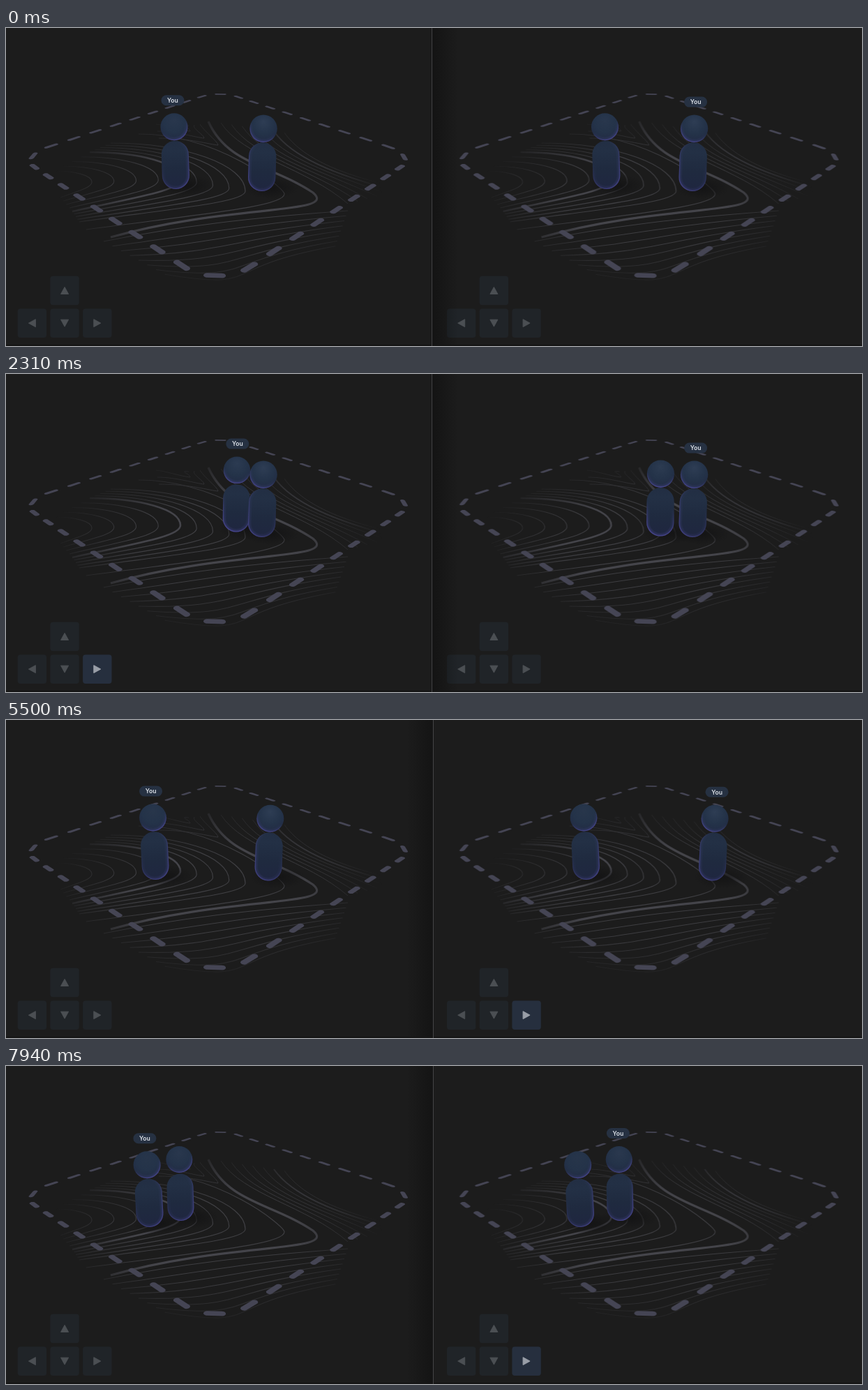
Recreate the animation shown at these times as an HTML page with a canvas. Size 1227x456 px, loop 8 s.

```html
<!DOCTYPE html>
<html lang="en">
<head>
<meta charset="utf-8">
<title>Two players</title>
<style>
html, body { margin: 0; width: 100%; height: 100%; overflow: hidden; background: #1c1c1c; }
canvas { display: block; width: 1227px; height: 456px; }
</style>
</head>
<body>
<canvas id="stage" width="1227" height="456"></canvas>
<script>
const W = 1227, H = 456, LOOP = 8000, STEP = 62.5;
const LAG = 170, SOFT = 140, CENTER = 304.6;
const BOARD_SHIFT = 617.5, PAD_SHIFT = 615.3;
const ctx = document.getElementById('stage').getContext('2d');
const clamp = (v, lo, hi) => Math.max(lo, Math.min(hi, v));

// ---------- motion ----------
// A leg moves a foot by (dx, dy) while its key is held; a push has no key.
const leg = (key, from, to, dx, dy) => ({ key, from, to, dx, dy });
const leftPlayer = {
  x: 244, y: 231,
  legs: [
    leg('left', 270, 820, -104, 0),
    leg('down', 960, 1290, 0, 27),
    leg('right', 1240, 2070, 183, 0),
    leg('up', 1750, 2150, 0, -31.5),
    leg('right', 2070, 2480, 16, 0),
    leg('left', 2500, 3300, -165, 2.5),
    leg('right', 3520, 3860, 41, 0),
    leg('push', 7400, 7640, -8, 2)
  ]
};
const rightPlayer = {
  x: 366, y: 234,
  legs: [
    leg('push', 2300, 2480, 8.5, -3.5),
    leg('right', 5290, 6136, 118.5, 0),
    leg('down', 6100, 6440, 0, 15),
    leg('left', 6321, 7595, -242, 0),
    leg('up', 6700, 7000, 0, -23.5),
    leg('right', 7785, 8000, 32, 0)
  ]
};

// Time travelled since a start, with a soft build-up of speed.
const ramp = s => s <= 0 ? 0 : s < SOFT ? s * s / (2 * SOFT) : s - SOFT / 2;

function foot(player, t) {
  let { x, y } = player;
  for (const { from, to, dx, dy } of player.legs) {
    const done = (ramp(t - from) - ramp(t - to)) / (to - from);
    x += dx * done;
    y += dy * done;
  }
  return { x, y };
}
const holds = (player, key, t) =>
  player.legs.some(l => l.key === key && t >= l.from && t < l.to);

// ---------- board ----------
// Square-plane coordinates: (0,0) left, (1,0) near, (1,1) right, (0,1) far corner.
function plane(a, b) {
  const X = a + b - 1, Y = b - a, w = 1 + 0.0026 * X + 0.338 * Y;
  return [(CENTER + 286.4 * X + 104.3 * Y) / w, (184.05 + 0.13 * X - 63.6 * Y) / w];
}

const RADIUS = 0.115, SIDE = 1 - 2 * RADIUS, QUARTER = SIDE + RADIUS * Math.PI / 2;

// A point on the rounded border, pushed outward by off.
function border(u, off) {
  const turn = Math.floor(u / QUARTER);
  const s = u - turn * QUARTER;
  let a = RADIUS + s, b = -off;
  if (s > SIDE) {
    const angle = (s - SIDE) / RADIUS, r = RADIUS + off;
    a = 1 - RADIUS + r * Math.sin(angle);
    b = RADIUS - r * Math.cos(angle);
  }
  for (let k = 0; k < (turn + 4) % 4; k++) [a, b] = [1 - b, a];
  return plane(a, b);
}

function drawDash(g, u) {
  const half = 0.0185, thick = 0.0088;
  g.beginPath();
  for (const end of [1, -1]) {
    for (let k = 0; k <= 10; k++) {
      const angle = Math.PI * (k / 10 - 0.5);
      g.lineTo(...border(u + end * (half + thick * Math.cos(angle)), end * thick * Math.sin(angle)));
    }
  }
  g.fill();
}

const THIN = '#404044', BOLD = '#46464c';

// Points are a start followed by triples of two handles and an end.
function curve(g, p, width, color = THIN) {
  g.beginPath();
  g.moveTo(...p[0]);
  for (let i = 1; i < p.length; i += 3) g.bezierCurveTo(...p[i], ...p[i + 1], ...p[i + 2]);
  g.lineWidth = width;
  g.strokeStyle = color;
  g.stroke();
}
const mix = (p, q, f) => p.map((a, i) => [a[0] + (q[i][0] - a[0]) * f, a[1] + (q[i][1] - a[1]) * f]);

function family(g, p, q, count, reach, width) {
  for (let i = 0; i <= count; i++) curve(g, mix(p, q, reach * i / count), width);
}

// A contour that runs out to a tip and back; round sets how blunt the upper side is.
function tongue([x0, y0], [tx, ty], [x1, y1], round) {
  return [
    [x0, y0], [x0 + (tx - x0) * 0.55, y0], [tx, ty - (ty - y0) * round], [tx, ty],
    [tx, ty + (y1 - ty) * 0.35], [x1 + (tx - x1) * 0.6, y1 - (y1 - ty) * 0.45], [x1, y1]
  ];
}
const core = tongue([70, 205], [123, 221], [78, 243], 0.6);
const ridge = tongue([120, 178], [250, 217], [95, 263], 0.6);
const flank = tongue([150, 165], [343, 234], [105, 278], 0.55);
const spur = tongue([190, 152], [399, 238], [115, 289], 0.1);
const valley = [[290, 134], [318, 196], [380, 196], [440, 236], [478, 268], [320, 252], [150, 300]];
const south = [[[140, 306], [250, 284], [350, 272], [490, 262]], [[190, 333], [320, 337], [320, 313], [480, 291]]];
const east = [[[308, 136], [340, 185], [430, 200], [490, 252]], [[384, 148], [410, 185], [470, 210], [560, 234]]];

function makeBoard() {
  const c = document.createElement('canvas');
  c.width = 614;
  c.height = H;
  const g = c.getContext('2d');

  family(g, core, ridge, 4, 1, 1.1);
  family(g, ridge, flank, 4, 1, 1.2);
  curve(g, spur, 1.2);
  family(g, ...south, 7, 1.75, 1.1);
  family(g, ...east, 6, 1.2, 1);
  for (let i = 0; i < 3; i++) {
    const x = 304 - 20 * i, y = 168 - 10 * i;
    curve(g, [[278 - 8 * i, 138 + i], [x - 18, y - 18 + 4 * i], [x, y - 5], [x, y],
              [x - 12, y - 1], [x - 40, y - 10], [x - 85 + 18 * i, y - 10]], 0.9);
  }
  curve(g, east[1], 2, BOLD);
  curve(g, ridge, 2.6, BOLD);
  curve(g, valley, 3.2, BOLD);

  // Fade the contour lines towards the rim.
  g.globalCompositeOperation = 'destination-in';
  g.translate(300, 245);
  g.scale(1, 0.54);
  const fade = g.createRadialGradient(0, 0, 0, 0, 0, 240);
  fade.addColorStop(0, 'rgba(0,0,0,1)');
  fade.addColorStop(0.5, 'rgba(0,0,0,0.95)');
  fade.addColorStop(0.8, 'rgba(0,0,0,0.4)');
  fade.addColorStop(1, 'rgba(0,0,0,0)');
  g.fillStyle = fade;
  g.fillRect(-400, -500, 1000, 1000);

  g.resetTransform();
  g.globalCompositeOperation = 'source-over';
  g.fillStyle = '#454554';
  for (let k = 0; k < 40; k++) drawDash(g, (k + 40) * QUARTER / 10 - 0.0016);
  return c;
}

// ---------- figures ----------
function gradient(x0, y0, x1, y1, ...stops) {
  const g = ctx.createLinearGradient(x0, y0, x1, y1);
  stops.forEach(([at, color]) => g.addColorStop(at, color));
  return g;
}

const CLEAR = 'rgba(88,82,175,0)', GLOW = 'rgb(88,82,175)';

// Glow along the inside of the current path.
function rim(paint) {
  ctx.clip();
  ctx.strokeStyle = paint;
  for (const [width, alpha] of [[9, 0.14], [5, 0.22], [2.2, 0.6]]) {
    ctx.globalAlpha = alpha;
    ctx.lineWidth = width;
    ctx.stroke();
  }
}

function drawShadow({ x, y }) {
  ctx.save();
  ctx.translate(x + 14, y - 5);
  ctx.scale(1, 0.4);
  const g = ctx.createRadialGradient(0, 0, 4, 0, 0, 40);
  g.addColorStop(0, 'rgba(18,18,19,0.75)');
  g.addColorStop(1, 'rgba(18,18,19,0)');
  ctx.fillStyle = g;
  ctx.fillRect(-40, -40, 80, 80);
  ctx.restore();
}

function drawFigure({ x, y }) {
  const near = y - 222;
  const r = 19 + near * 0.057, rise = 88 + near * 0.143, tall = 3.55 * r;
  const lean = (x - CENTER) * 0.05;
  const inner = clamp((CENTER - x) / 60, -1, 1);

  ctx.save();
  ctx.translate(x, y);
  ctx.rotate(Math.atan2(lean, rise));
  ctx.beginPath();
  ctx.roundRect(-r, -tall, 2 * r, tall, r);
  ctx.fillStyle = gradient(0, -tall, 0, 0, [0, '#222e43'], [0.2, '#233045'], [0.6, '#1f2a3f'], [1, '#1f2640']);
  ctx.fill();
  rim(gradient(-inner * 2 * r, -tall * 0.9, inner * 2 * r, 0, [0.3, CLEAR], [0.9, GLOW]));
  ctx.restore();

  ctx.save();
  ctx.translate(x + lean, y - rise);
  ctx.beginPath();
  ctx.arc(0, 0, r, 0, Math.PI * 2);
  const lit = clamp((x - 200) / 170, 0, 1);
  const ball = ctx.createRadialGradient(0, -r * 0.5, 0, 0, -r * 0.3, r * 1.4);
  ball.addColorStop(0, `rgb(${39 + 7 * lit},${53 + 8 * lit},${74 + 10 * lit})`);
  ball.addColorStop(0.55, '#243349');
  ball.addColorStop(1, '#212a43');
  ctx.fillStyle = ball;
  ctx.fill();
  rim(gradient(-inner * r * 0.5, -r, inner * r * 0.5, r, [0.5, CLEAR], [1, GLOW]));
  ctx.restore();
}

function drawLabel({ x, y }) {
  const cx = x + (x - CENTER) * 0.083;
  const cy = y - 125.5 - (y - 222) * 0.2;
  ctx.fillStyle = '#263142';
  ctx.beginPath();
  ctx.roundRect(cx - 16.5, cy - 7.5, 33, 15, 7.5);
  ctx.fill();
  ctx.fillStyle = '#dce1e8';
  ctx.font = '600 8.6px Inter, sans-serif';
  ctx.textAlign = 'center';
  ctx.fillText('You', cx, cy + 3.2);
}

// ---------- keypad ----------
function drawKey(column, row, turns, on) {
  ctx.save();
  ctx.translate(37.4 + 46.7 * column, 376.5 + 46.7 * row);
  ctx.fillStyle = on ? '#262f3e' : '#202428';
  ctx.beginPath();
  ctx.roundRect(-20.7, -20.7, 41.4, 41.4, 4);
  ctx.fill();
  ctx.rotate(turns * Math.PI / 2);
  ctx.fillStyle = ctx.strokeStyle = on ? '#999ea7' : '#4b4f53';
  ctx.lineJoin = 'round';
  ctx.beginPath();
  ctx.moveTo(-5.5, 5);
  ctx.lineTo(0, -5);
  ctx.lineTo(5.5, 5);
  ctx.closePath();
  ctx.fill();
  ctx.stroke();
  ctx.restore();
}

function drawPad(player, t) {
  drawKey(1, 0, 0, holds(player, 'up', t));
  drawKey(0, 1, 3, holds(player, 'left', t));
  drawKey(1, 1, 2, holds(player, 'down', t));
  drawKey(2, 1, 1, holds(player, 'right', t));
}

// ---------- scene ----------
const board = makeBoard();

function drawPanel(from, to, boardShift, padShift, player, other, t) {
  const own = foot(player, t), late = foot(other, t - LAG);
  const figures = [own, late].sort((a, b) => a.y - b.y);
  ctx.save();
  ctx.beginPath();
  ctx.rect(from, 0, to - from, H);
  ctx.clip();
  ctx.translate(boardShift, 0);
  ctx.drawImage(board, 0, 0);
  figures.forEach(drawShadow);
  figures.forEach(drawFigure);
  drawLabel(own);
  ctx.translate(padShift - boardShift, 0);
  drawPad(player, t);
  ctx.restore();
}

function drawDivider(t) {
  const swap = clamp((t - 3850) / 650, 0, 1);
  const dark = a => `rgba(12,12,12,${a})`;
  ctx.fillStyle = gradient(612, 0, 648, 0, [0, dark(0.5 * (1 - swap))], [1, dark(0)]);
  ctx.fillRect(612, 0, 36, H);
  ctx.fillStyle = gradient(575, 0, 611, 0, [0, dark(0)], [1, dark(0.5 * swap)]);
  ctx.fillRect(575, 0, 36, H);
  ctx.fillStyle = '#151515';
  ctx.fillRect(0, 454, W, 2);
  ctx.fillRect(609, 0, 4, H);
  ctx.fillStyle = '#444446';
  ctx.fillRect(t < 4750 ? 610 : 612, 0, 1, H);
}

function draw(t) {
  ctx.fillStyle = '#1c1c1c';
  ctx.fillRect(0, 0, W, H);
  drawPanel(0, 611, 0, 0, leftPlayer, rightPlayer, t);
  drawPanel(611, W, BOARD_SHIFT, PAD_SHIFT, rightPlayer, leftPlayer, t);
  drawDivider(t);
}

const start = performance.now();
function tick() {
  const t = (performance.now() - start) % LOOP;
  draw(Math.floor((t + 3) / STEP) * STEP);
  requestAnimationFrame(tick);
}
tick();
</script>
</body>
</html>
```
